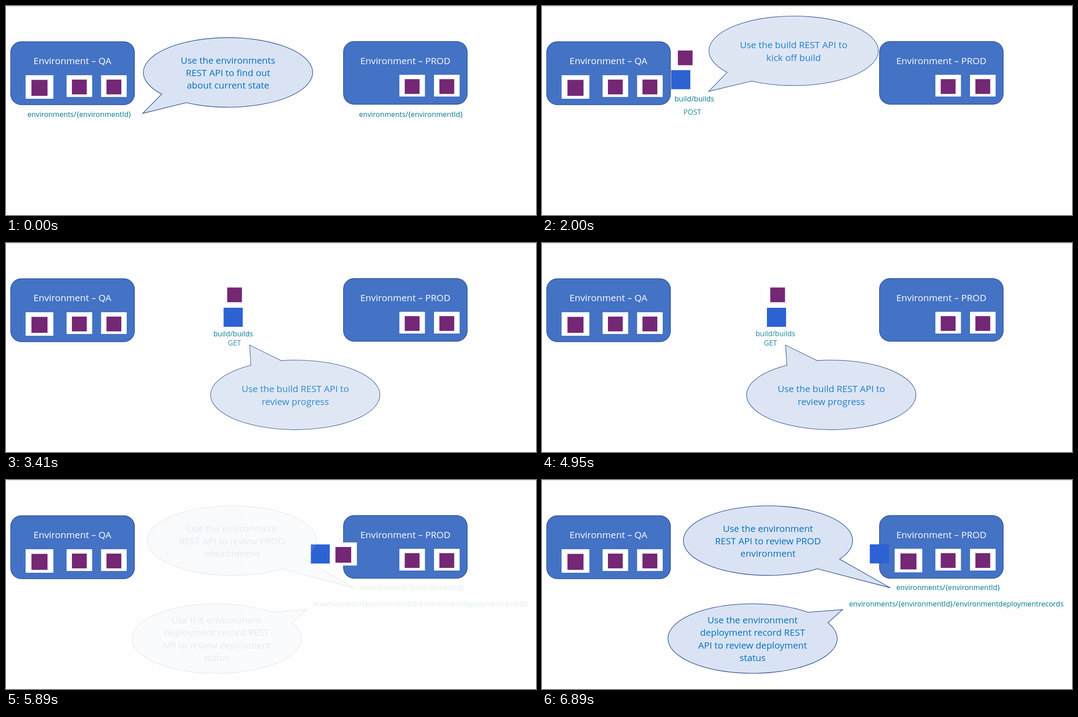
An HTML page for the animation above (7.97 s loop, 1190 px wide and 471 px high).

```html
<!DOCTYPE html>
<html lang="en">
<head>
<meta charset="utf-8">
<title>Release flow</title>
<style>
  html, body { margin: 0; width: 100%; height: 100%; overflow: hidden; background: #fefefe; }
  svg { display: block; width: 1190px; height: 471px; font-family: "Open Sans", "Noto Sans", sans-serif; text-anchor: middle; }

  .env rect { fill: #4472c4; stroke: #2f528f; stroke-width: 1.33; }
  .env text { fill: #fff; font-size: 20.8px; }
  .bubble path { fill: #dae3f3; stroke: #2f528f; stroke-width: 1.33; }
  .bubble text { fill: #0070c0; font-size: 20.65px; }
  .path { fill: #00788f; font-size: 16.1px; }
  .tile { fill: #fff; }
  .mark { fill: #742774; }
  .runner { fill: #2d62d3; }

  .step1, .step2, .step3, .step4, .cargo, .tag, .move { animation: 7970ms linear infinite; }
  .step1 { animation-name: step1; }
  .step2 { animation-name: step2; }
  .step3 { animation-name: step3; }
  .step4 { animation-name: step4; }
  .cargo { animation-name: cargo; }
  .tag { animation-name: tag; }
  .move { animation-timing-function: cubic-bezier(.39, .575, .565, 1); }
  .move.app { animation-name: app; }
  .move.runner { animation-name: runner; }
  .move.path { animation-name: label; }

  @keyframes step1 { 0%, 3.26% { opacity: 1 } 9.29%, 100% { opacity: 0 } }
  @keyframes step2 { 0%, 13.3% { opacity: 0 } 19.7%, 24.34% { opacity: 1 } 30.61%, 100% { opacity: 0 } }
  @keyframes step3 { 0%, 37.64% { opacity: 0 } 43.91%, 61.48% { opacity: 1 } 67.75%, 100% { opacity: 0 } }
  @keyframes step4 { 0%, 73.15% { opacity: 0 } 79.55%, 100% { opacity: 1 } }
  @keyframes cargo { 0%, 13.3% { opacity: 0 } 19.7%, 100% { opacity: 1 } }
  @keyframes tag { 0%, 13.3% { opacity: 0 } 19.7%, 61.48% { opacity: 1 } 67.75%, 100% { opacity: 0 } }

  @keyframes app {
    0%, 25.97% { transform: translate(321.5px, 115px) scale(.92) }
    49.56%, 62.8% { transform: translate(529px, 115px) scale(.92) }
    83.5%, 100% { transform: translate(822.8px, 181.5px) scale(1) }
  }
  @keyframes runner {
    0%, 25.97% { transform: translate(290px, 144.5px) }
    49.56%, 62.8% { transform: translate(505px, 146px) }
    83.5%, 100% { transform: translate(736px, 145px) }
  }
  @keyframes label {
    0%, 25.97% { transform: translate(342px, 215px) }
    49.56%, 100% { transform: translate(524px, 210px) }
  }
</style>
</head>
<body>
<svg viewBox="0 0 1190 471">
  <rect width="1190" height="1" fill="#d4d4d6"/>

  <g class="env">
    <rect x="10.5" y="80.5" width="278" height="142" rx="24"/>
    <text x="149.2" y="131">Environment – QA</text>
  </g>
  <g class="env">
    <rect x="757.7" y="80" width="278" height="141.5" rx="24"/>
    <text x="896.7" y="130.7">Environment – PROD</text>
  </g>
  <g id="tiles"></g>

  <g class="cargo">
    <rect class="runner move" width="43" height="43"/>
    <g class="app move">
      <rect class="tile" x="-31" y="-26.5" width="62" height="53"/>
      <rect class="mark" x="-18" y="-16" width="36" height="36"/>
    </g>
  </g>
  <g class="tag"><text class="path move">build/builds</text></g>

  <g class="step1" id="step1">
    <text class="path" x="164.7" y="249.5">environments/{environmentId}</text>
    <text class="path" x="909.3" y="249.5">environments/{environmentId}</text>
  </g>
  <g class="step2" id="step2">
    <text class="path" x="337.5" y="244.5">POST</text>
  </g>
  <g class="step3" id="step3">
    <text class="path" x="513" y="230.7">GET</text>
  </g>
  <g class="step4" id="step4">
    <text class="path" x="912" y="247.7">environments/{environmentId}</text>
    <text class="path" x="930.3" y="284.5">environments/{environmentId}/environmentdeploymentrecords</text>
  </g>
</svg>
<script>
  const RX = 190, RY = 78.4, LINE = 28.4;

  function add(parent, tag, attrs, text = "") {
    const el = document.createElementNS("http://www.w3.org/2000/svg", tag);
    for (const key in attrs) el.setAttribute(key, attrs[key]);
    el.textContent = text;
    return parent.appendChild(el);
  }

  function tile(x, y, w, h) {
    const box = document.getElementById("tiles"), side = h * 0.68;
    add(box, "rect", { class: "tile", x, y, width: w, height: h });
    add(box, "rect", { class: "mark", x: x + (w - side) / 2, y: y + (h - side) / 2 + 2, width: side, height: side });
  }

  // Ellipse callout: the tail opens 11 degrees to each side of its tip.
  function bubble(step, cx, cy, tipX, tipY, lines) {
    const g = add(document.getElementById(step), "g", { class: "bubble" });
    const mid = Math.atan2((tipY - cy) / RY, (tipX - cx) / RX);
    const rim = deg => {
      const a = mid + deg * Math.PI / 180;
      return `${cx + RX * Math.cos(a)} ${cy + RY * Math.sin(a)}`;
    };
    add(g, "path", { d: `M${rim(-11)}L${tipX} ${tipY}L${rim(11)}A${RX} ${RY} 0 1 1 ${rim(-11)}Z` });
    lines.forEach((line, i) =>
      add(g, "text", { x: cx, y: cy + 8.3 + (i - (lines.length - 1) / 2) * LINE }, line));
  }

  tile(44, 156, 62.4, 53);
  tile(136, 156, 57.4, 49);
  tile(213.5, 156, 57.5, 49);
  tile(883.3, 155, 57.3, 49);
  tile(961, 155, 57.5, 49);

  bubble("step1", 498.5, 149.7, 307, 242,
    ["Use the environments", "REST API to find out", "about current state"]);
  bubble("step2", 565, 101, 374, 192.5,
    ["Use the build REST API to", "kick off build"]);
  bubble("step3", 649.5, 342.3, 547, 230,
    ["Use the build REST API to", "review progress"]);
  bubble("step4", 507.4, 136.6, 782, 243,
    ["Use the environment", "REST API to review PROD", "environment"]);
  bubble("step4", 472.8, 357.3, 675, 292,
    ["Use the environment", "deployment record REST", "API to review deployment", "status"]);
</script>
</body>
</html>
```
